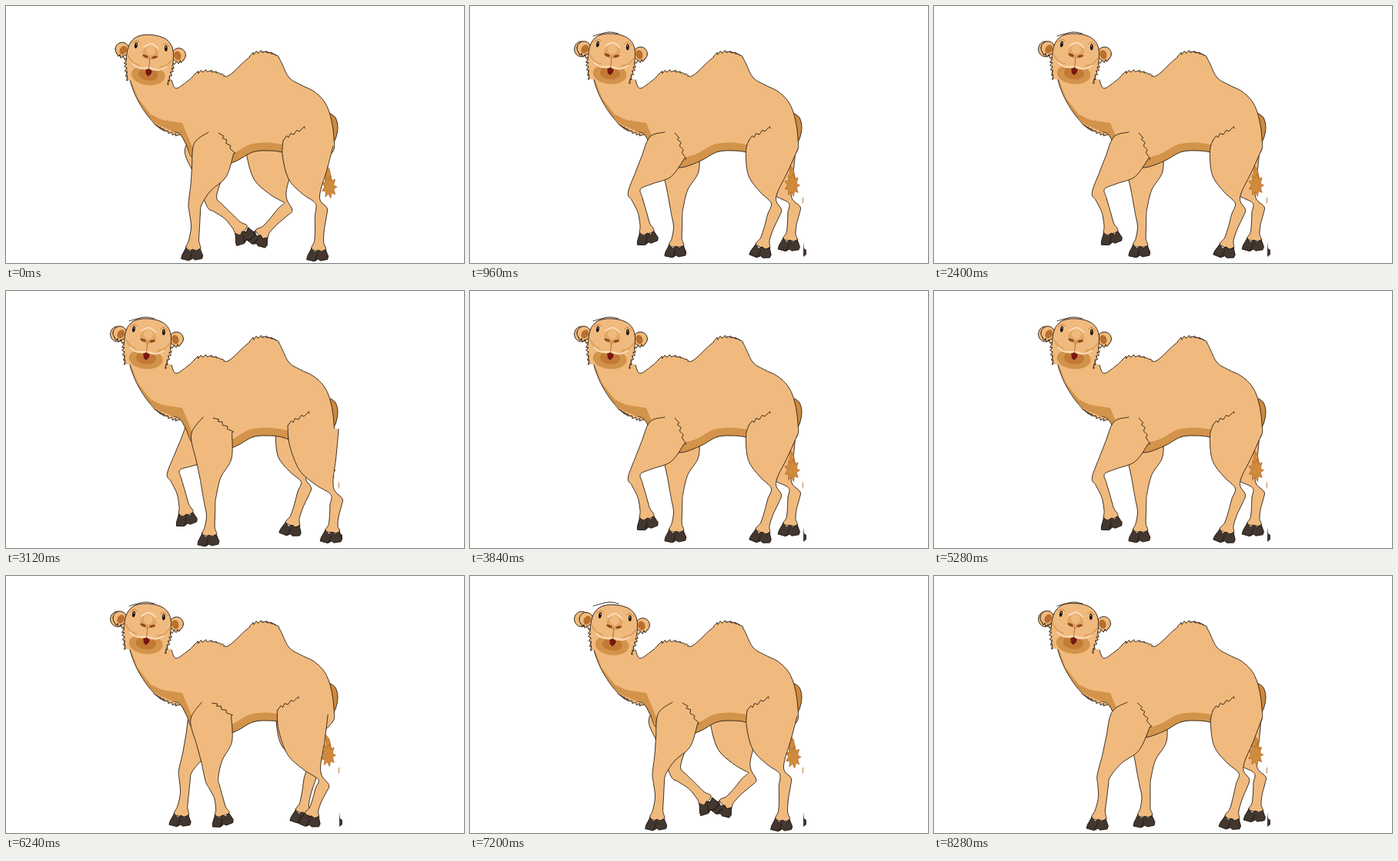
Animation of 595x334 px, one loop 8360 ms. Source, as an HTML page with a canvas:

```html
<!DOCTYPE html>
<html lang="en">
<head>
<meta charset="utf-8">
<title>Walking camel</title>
<style>
html, body { margin: 0; width: 100%; height: 100%; overflow: hidden; background: #fff; }
canvas { display: block; }
</style>
</head>
<body>
<canvas id="stage" width="595" height="334"></canvas>
<script>
const ctx = document.getElementById('stage').getContext('2d');
const SKIN = '#f0ba7e', SHADE = '#d2934a', DEEP = '#b8702e', CREAM = '#fbe6cc';
const INK = '#2a1c10', TAIL = '#cf8a3c', HOOF = '#43372f';
const CYCLE = 24, LOOP = 8360;

// Each pose: hip x, knee x and y, ankle x and y, keyed by step of the walk.
// Each section of a leg: place along the bone, width to the front, width to the back.
const front = {
  hipY: 171, shift: [-4, 5],
  thigh: [[.15, 21, 32], [.5, 16, 30], [.75, 12, 15]],
  shin: [[0, 9, 8], [.2, 7, 7], [.5, 4, 7], [.8, 6, 7], [1, 9, 9]],
  start: [-5, -7],
  tuft: (hip, line) => [hip + 8, 165, ...line.slice(-2)],
  poses: {
    0: [268, 246, 258, 243, 316],
    4: [261, 265, 267, 264, 317],
    6: [266, 270, 267, 270, 317],
    12: [246, 264, 260, 303, 298],
    16: [258, 214, 240, 230, 295],
    18: [256, 221, 260, 214, 316]
  }
};
const hind = {
  hipY: 175, shift: [8, 9],
  thigh: [[.15, 36, 31], [.5, 34, 16], [.75, 20, 4], [.9, 7, 1]],
  shin: [[0, 6, 8], [.2, 7, 8], [.5, 6, 6], [.8, 6, 6], [1, 9, 9]],
  start: [-32, 0],
  tuft: (hip, line) => [line[0], line[1], hip - 4, 159],
  poses: {
    0: [392, 409, 262, 406, 317],
    4: [398, 429, 269, 424, 313],
    6: [400, 431, 269, 426, 314],
    12: [353, 374, 269, 339, 307],
    16: [394, 397, 262, 380, 313],
    18: [394, 402, 262, 387, 315]
  }
};

function poseAt({ poses }, phase) {
  const keys = Object.keys(poses).map(Number);
  const from = keys.filter(k => k <= phase).pop();
  const next = keys.find(k => k > phase) ?? CYCLE;
  const u = (phase - from) / (next - from), to = poses[next % CYCLE];
  return poses[from].map((v, i) => v + (to[i] - v) * u);
}

// Smooth open curve through a flat list of points.
function spline(p) {
  const path = new Path2D(), n = p.length / 2;
  const at = (i, c) => p[2 * Math.max(0, Math.min(n - 1, i)) + c];
  path.moveTo(p[0], p[1]);
  for (let i = 0; i < n - 1; i++) {
    const c1 = [0, 1].map(c => at(i, c) + (at(i + 1, c) - at(i - 1, c)) / 6);
    const c2 = [0, 1].map(c => at(i + 1, c) - (at(i + 2, c) - at(i, c)) / 6);
    path.bezierCurveTo(...c1, ...c2, at(i + 1, 0), at(i + 1, 1));
  }
  return path;
}

function poly(p) {
  const path = new Path2D();
  for (let i = 0; i < p.length; i += 2) path.lineTo(p[i], p[i + 1]);
  return path;
}

function paint(path, fill, line, width = .9) {
  if (fill) { ctx.fillStyle = fill; ctx.fill(path); }
  if (line) { ctx.strokeStyle = line; ctx.lineWidth = width; ctx.stroke(path); }
}

function oval(x, y, rx, ry, turn, fill, line) {
  const path = new Path2D();
  path.ellipse(x, y, rx, ry, turn, 0, 7);
  paint(path, fill, line);
}

// Row of hairs on the left-hand side of a line, bulging by "arch".
function fur(x0, y0, x1, y1, count, arch = 0) {
  const dx = x1 - x0, dy = y1 - y0, len = Math.hypot(dx, dy), p = [];
  const place = (u, out) => {
    out += arch * 4 * u * (1 - u);
    p.push(x0 + dx * u + dy / len * out, y0 + dy * u - dx / len * out);
  };
  for (let i = 0; i < count; i++) {
    place(i / count, 0);
    place((i + .9 + .3 * Math.sin(i * 5)) / count, 2.2 + 1.2 * Math.sin(i * 7 + 1));
  }
  place(1, 0);
  paint(poly(p), SKIN, INK);
}

function sections(list, x0, y0, x1, y1) {
  const dx = x1 - x0, dy = y1 - y0, len = Math.hypot(dx, dy);
  return list.map(([u, ...widths]) => widths.map((w, back) => {
    const k = (back ? -w : w) / len;
    return [x0 + dx * u - dy * k, y0 + dy * u + dx * k];
  }));
}

const hoof = poly([-9,-2, -14,8, -15,13, -5,15, 0,12, 3,14, 12,12, 13,8, 9,-1, 4,3, 0,0, -4,3]);

function drawLeg(leg, phase, near) {
  let [hip, kx, ky, ax, ay] = poseAt(leg, phase);
  if (!near) {
    const [sx, sy] = leg.shift;
    hip -= sx; kx -= sx; ax -= sx; ky -= sy; ay -= sy;
  }
  const rows = [
    ...sections(leg.thigh, hip, leg.hipY, kx, ky),
    ...sections(leg.shin, kx, ky, ax, ay)
  ];
  const line = [
    hip + leg.start[0], leg.hipY + leg.start[1],
    ...rows.flatMap(r => r[0]), ...rows.reverse().flatMap(r => r[1])
  ];
  paint(spline(line), SKIN, INK);
  if (near) fur(...leg.tuft(hip, line), 4);

  ctx.save();
  ctx.translate(ax, ay);
  ctx.rotate(-.6 * Math.atan2(ax - kx, ay - ky));
  paint(hoof, HOOF, '#1c1512');
  paint(poly([-4,14, -1,5]), null, '#1c1512');
  ctx.restore();
}

const back = [
  215,96, 221,107, 238,96, 251,86, 278,90, 290,90, 312,70, 324,62, 340,60, 354,67, 367,92,
  382,102, 400,111, 414,125, 422,145, 426,172, 424,190
];
const belly = [362,191, 340,188, 320,190, 298,202, 270,210];
const throat = [243,198, 234,180, 224,165, 203,161, 186,145, 172,124, 163,103, 157,80];
const body = spline([...back, 400,206, ...belly, ...throat]);
const throatShade = poly([...throat, 163,98, 171,119, 188,141, 203,148, 229,152, 239,176, 246,194]);

function drawBody() {
  paint(body, SKIN);
  ctx.save();
  ctx.clip(body);
  paint(throatShade, SHADE);
  paint(spline(belly), null, SHADE, 21);
  ctx.restore();
  paint(body, null, INK);
  fur(244, 90, 284, 91, 7, 5);
  fur(316, 66, 355, 67, 7, 6);
  fur(226, 167, 192, 152, 7, 2);
}

function drawTail(nod) {
  const tuft = [];
  for (let i = 0; i < 18; i++) {
    const a = i / 18 * 2 * Math.PI, r = i % 2 ? .6 : 1;
    tuft.push(420 - 2 * nod + 10 * r * Math.cos(a), 235 - 3 * nod + 15 * r * Math.sin(a));
  }
  paint(poly([415,206, 420,212, 424,230, 414,230]), TAIL, DEEP);
  paint(poly(tuft), TAIL, DEEP);
}

const half = [26,42, 29,26, 30.5,12, 28,-5, 18,-16];
const mirrored = [];
for (let i = half.length - 2; i >= 0; i -= 2) mirrored.push(half[i], half[i + 1]);
const skull = spline([...half.map((v, i) => i % 2 ? v : -v), 0,-19.5, ...mirrored]);

// Drawn upright around the bridge of the nose; features in pairs are mirrored.
function drawHead(nod) {
  const pair = draw => [-1, 1].forEach(side => {
    ctx.save();
    ctx.scale(side, 1);
    draw();
    ctx.restore();
  });
  ctx.save();
  ctx.translate(188 - 4 * nod, 57 - 2 * nod);
  ctx.rotate(.1);
  pair(() => {
    oval(37, 3, 9, 9, 0, SKIN, INK);
    oval(35.5, 4, 4.5, 6, -.4, DEEP);
    fur(44, 8, 30, 14, 3);
  });
  paint(skull, SKIN);
  paint(skull, null, INK);
  oval(0, 33, 22, 13, 0, SHADE);
  oval(0, 32, 13, 8, 0, '#c27a35');
  oval(0, 16, 23, 11, 0, SKIN);
  oval(0, 4, 10.5, 9, 0, '#e2a563');
  oval(0, 1, 6, 6, 0, SKIN);
  pair(() => {
    fur(30, 16, 26, 42, 5);
    paint(spline([29,10, 22,18, 14,21]), null, '#dd9f5c', 2);
    paint(spline([22,20, 13,25, 0,23]), null, CREAM, 1.5);
    oval(6, 9, 4, 1.7, -.3, '#8f4a1c');
    oval(19.5, -4, 1.9, 3.9, -.1, '#17110d');
    oval(19, -5.5, .6, .8, 0, '#fff');
    paint(spline([15,-8, 19,-10, 24,-7]), null, DEEP, .8);
  });
  paint(spline([-9,-3, 0,-8, 9,-3]), null, CREAM, 1.6);
  paint(poly([0,11, 0,24]), null, '#a8662c');
  paint(poly([-4,27, 0,25, 4,27, 3,31, 0,34, -3,31]), '#7d1511', '#4d0c08');
  ctx.restore();
}

// Edges of the widest pose, left standing once it has been reached.
function drawTraces() {
  oval(145, 56, 9.5, 10, 0, SKIN, INK);
  paint(spline([160,39, 180,34, 193,36]), null, INK);
  paint(poly([433,307, 434,315, 437,317, 437,323, 433,326]), HOOF);
  paint(poly([432.5,249, 432.5,256]), null, DEEP);
}

function frame() {
  const t = performance.now() % LOOP;
  const step = 2 * Math.floor(t / 120) + (t % 120 >= 80 ? 1 : 0);
  const phase = step % CYCLE, opposite = (phase + CYCLE / 2) % CYCLE;
  const nod = (1 - Math.cos(phase * Math.PI / 6)) / 2;

  ctx.fillStyle = '#fff';
  ctx.fillRect(0, 0, 595, 334);
  ctx.lineJoin = ctx.lineCap = 'round';

  if (step > 6) drawTraces();
  paint(spline([420,139, 428,145, 431,158, 428,173, 423,180]), TAIL, INK);
  drawLeg(hind, opposite, false);
  drawLeg(front, opposite, false);
  drawTail(nod);
  drawBody();
  drawLeg(hind, phase, true);
  drawLeg(front, phase, true);
  drawHead(nod);
  requestAnimationFrame(frame);
}
frame();
</script>
</body>
</html>
```
